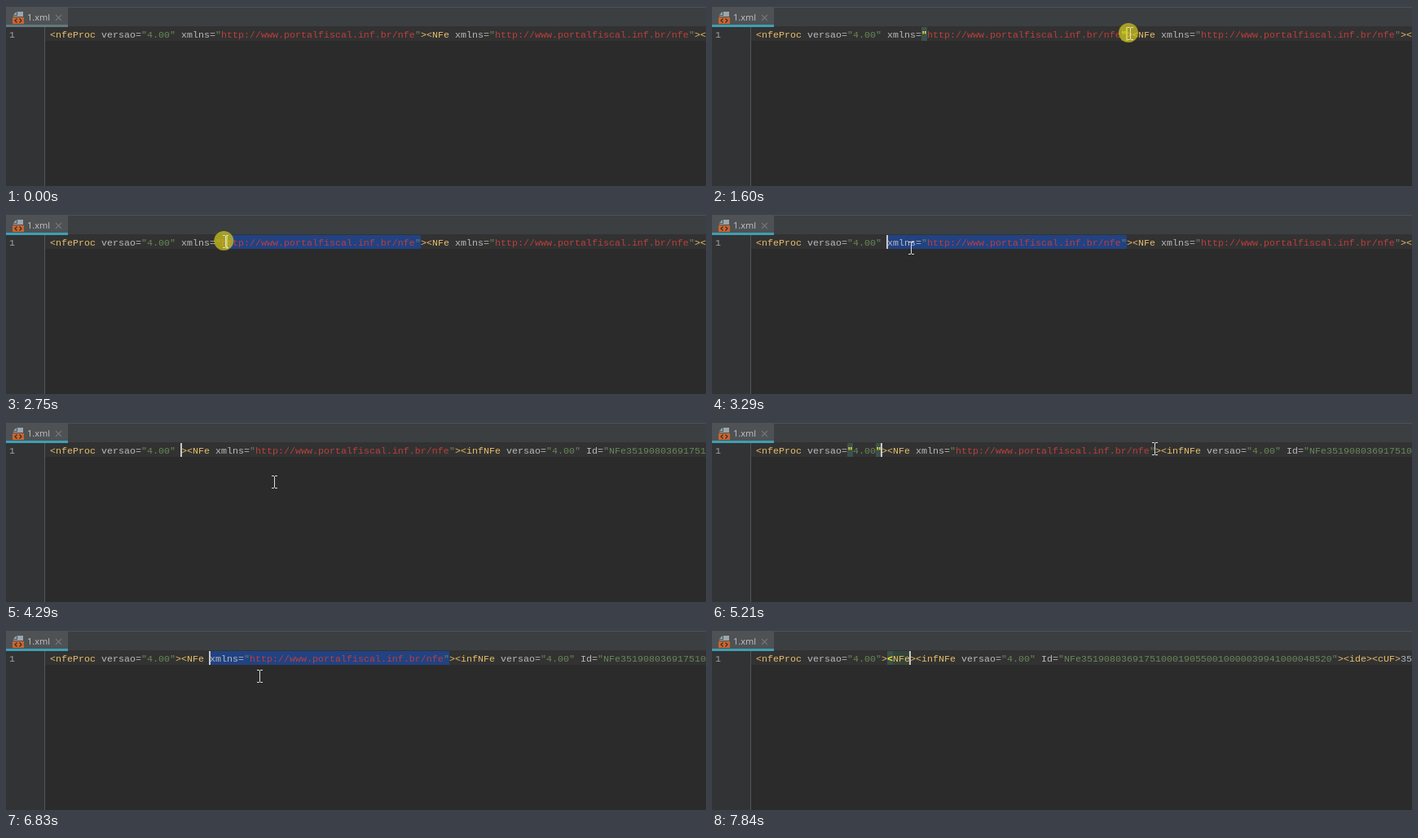
Animation of 859 by 222 pixels, one loop 8 s. Source, as an HTML page with a canvas:

```html
<!DOCTYPE html>
<html lang="en">
<head>
<meta charset="utf-8">
<title>XML editor</title>
<style>
html, body { margin: 0; width: 100%; height: 100%; overflow: hidden; background: #2b2b2b; }
canvas { display: block; }
</style>
</head>
<body>
<canvas id="stage" width="859" height="222"></canvas>
<script>
const ctx = document.getElementById('stage').getContext('2d');
const W = 859, H = 222, LOOP = 8000;
const LEFT = 54, CHAR = 7, ROW = 26, ROW_H = 17, BASE = 39;
const MONO = '11.667px "Courier New", "Liberation Mono", monospace';
const UI = '11px "Segoe UI", "Open Sans", sans-serif';
const COLORS = { tag: '#e8bf6a', attr: '#bababa', text: '#a9b7c6', value: '#6a8759', error: '#bc3f3c' };

const HEAD = '<nfeProc versao="4.00"';
const NS = ' xmlns="http://www.portalfiscal.inf.br/nfe"';
const TAIL = '><infNFe versao="4.00" Id="NFe35190803691751000190550010000039941000048520"><ide><cUF>35';
const SPAN = NS.length - 1;

// Each edit: click, drag left over the namespace, delete it, then delete the space
const EDITS = [
  { press: 1520, start: 1790, end: 3050, cut: 4290, trim: 4700, col: 23, power: 1.2 },
  { press: 5670, start: 5771, end: 6400, cut: 7100, trim: 7450, col: 28, power: 3 }
];
const [FIRST, SECOND] = EDITS;

const between = (t, a, b) => t >= a && t < b;
const colX = col => LEFT + col * CHAR;
const mix = (a, b, k) => a + (b - a) * k;
const smooth = k => k * k * (3 - 2 * k);
const key = (t, x, y) => ({ t, x, y });

function dragPoint(e, t) {
  const k = 1 - Math.pow(1 - (t - e.start) / (e.end - e.start), e.power);
  const lift = 15 * Math.max(0, Math.sin(Math.PI * k / 0.82));
  return key(t, colX(e.col + SPAN * (1 - k)), 33 - lift);
}

const dragEnds = e => [dragPoint(e, e.start), dragPoint(e, e.end)];
const PATH = [
  key(270, 630, 153), key(890, 521, 36), key(1280, 511, 33), key(1600, 511, 33),
  ...dragEnds(FIRST),
  key(3290, 242, 41), key(FIRST.cut - 1, 242, 46), key(FIRST.cut, 327, 73),
  key(5050, 530, 31), key(5210, 541, 32),
  ...dragEnds(SECOND),
  key(6600, 250, 42), key(7200, 430, 83), key(7610, 875, 170)
];

function pointer(t) {
  const drag = EDITS.find(e => between(t, e.start, e.end));
  if (drag) return dragPoint(drag, t);
  const i = PATH.findIndex(p => p.t > t);
  if (i < 1) return null;
  const a = PATH[i - 1], b = PATH[i];
  const k = smooth((t - a.t) / (b.t - a.t));
  return key(t, mix(a.x, b.x, k), mix(a.y, b.y, k));
}

function box(x, y, w, h, color) {
  ctx.fillStyle = color;
  ctx.fillRect(x, y, w, h);
}

function write(str, x, y, color, font) {
  ctx.font = font;
  ctx.fillStyle = color;
  ctx.fillText(str, x, y);
}

function trace(points) {
  ctx.beginPath();
  points.forEach(([x, y]) => ctx.lineTo(x, y));
}

function shape(points, color) {
  trace(points);
  ctx.fillStyle = color;
  ctx.fill();
}

function stroke(points, color) {
  trace(points);
  ctx.strokeStyle = color;
  ctx.lineWidth = 1.1;
  ctx.stroke();
}

function lineAt(t) {
  const gap = e => t < e.cut ? NS : t < e.trim ? ' ' : '';
  return HEAD + gap(FIRST) + '><NFe' + gap(SECOND) + TAIL;
}

function drawCode(line) {
  const tokens = /(<\w*|>)|"(http[^"]*)"|("[^"]*")|(\w+=)|(\w+)/g;
  for (const m of line.matchAll(tokens)) {
    const x = colX(m.index);
    if (m[2]) {
      write('"', x, BASE, COLORS.value, MONO);
      write(m[2], x + CHAR, BASE, COLORS.error, MONO);
      write('"', x + CHAR * (m[2].length + 1), BASE, COLORS.value, MONO);
    } else {
      const kind = m[1] ? 'tag' : m[3] ? 'value' : m[4] ? 'attr' : 'text';
      write(m[0], x, BASE, COLORS[kind], MONO);
    }
  }
}

function markCols(col, count, color) {
  box(colX(col), ROW, count * CHAR, ROW_H, color);
}

function matchedCols(t, line) {
  const clicked = EDITS.find(e => between(t, e.press + 40, e.start));
  if (clicked) return [clicked.col + 6, clicked.col + SPAN - 1];
  if (between(t, FIRST.trim, SECOND.press)) return [HEAD.indexOf('"'), HEAD.length - 1];
  return t >= SECOND.trim ? [line.indexOf('<NFe')] : [];
}

function selectionStart(e, p) {
  if (p.t >= e.end) return e.col;
  return Math.max(e.col, Math.round((p.x + 2 - LEFT) / CHAR));
}

function caretCol(t, edit, p) {
  if (edit) return t < edit.start ? edit.col + SPAN : selectionStart(edit, p);
  const last = EDITS.filter(e => t >= e.cut).pop();
  if (!last) return -1;
  return t < last.trim ? last.col : last.col - 1;
}

function drawTab(focused) {
  box(0, 0, W, 26, '#3c3f41');
  box(0, 1, W, 1, '#4f5355');
  box(0, 2, 76, 21, '#4e5254');
  box(0, 25, W, 1, '#323232');
  box(0, 23, 76, 3, focused ? '#3f9fb3' : '#64787f');
  shape([[14, 7], [21, 7], [21, 13], [9, 13], [9, 12], [14, 12]], '#9aa7b0');
  shape([[13, 7], [13, 11], [9, 11]], '#9aa7b0');
  box(8, 14, 14, 8, '#c9652f');
  stroke([[13.5, 15.5], [11, 18], [13.5, 20.5]], '#3a2a22');
  stroke([[16.5, 15.5], [19, 18], [16.5, 20.5]], '#3a2a22');
  write('1.xml', 26, 18, '#bbbbbb', UI);
  stroke([[61, 11], [68, 18]], '#74787a');
  stroke([[68, 11], [61, 18]], '#74787a');
}

function drawTooltip() {
  shape([[537, 43], [544, 49], [530, 49]], '#4b4d4d');
  box(320, 49, 434, 34, '#636569');
  box(321, 50, 432, 32, '#4b4d4d');
  write('URI is not registered (Settings | Languages & Frameworks | Schemas and DTDs)',
    330, 70, '#bbbbbb', UI);
}

function drawPointer(p, pressed) {
  if (pressed) {
    ctx.beginPath();
    ctx.arc(p.x, p.y, 12, 0, Math.PI * 2);
    ctx.fillStyle = 'rgba(214, 203, 24, 0.7)';
    ctx.fill();
  }
  ctx.save();
  ctx.translate(Math.round(p.x) + 1, Math.round(p.y) + 1);
  if (p.y < ROW) {
    shape([[0, 0], [0, 15], [3.5, 12], [6, 18], [8.5, 17], [6, 11], [11, 11]], '#f4f4f4');
  } else {
    box(1, -7, 1, 14, '#dddddd');
    for (const y of [-8, 7]) {
      box(-2, y, 3, 1, '#dddddd');
      box(2, y, 3, 1, '#dddddd');
    }
  }
  ctx.restore();
}

function draw(t) {
  const p = pointer(t);
  const edit = EDITS.find(e => between(t, e.press, e.cut));
  const line = lineAt(t);

  box(0, 0, W, H, '#2b2b2b');
  drawTab(t >= FIRST.press + 40);
  box(0, ROW, 47, H - ROW, '#313335');
  box(47, ROW, 1, H - ROW, '#555555');
  box(48, ROW, W - 48, ROW_H, '#323232');
  write('1', 4, BASE, '#a4a3a3', MONO);

  const tint = '#35443a';
  if (between(t, 3590, FIRST.cut)) markCols(1, 7, tint);
  if (between(t, 5510, SECOND.start)) markCols(0, 8, tint);
  if (t >= 7840) markCols(line.indexOf('NFe>'), 3, tint);
  if (edit && t >= edit.start) {
    const start = selectionStart(edit, p);
    markCols(start, edit.col + SPAN - start, '#214283');
  }

  drawCode(line);
  for (const col of matchedCols(t, line)) {
    markCols(col, 1, '#3b514d');
    write(line[col], colX(col), BASE, '#ffef28', 'bold ' + MONO);
  }

  const caret = caretCol(t, edit, p);
  const blinkedOff = between(t, 3600, 4050);
  if (caret >= 0 && !blinkedOff) box(colX(caret) - 1, ROW, 2, ROW_H, '#c8c8c8');
  if (between(t, 5360, SECOND.press)) drawTooltip();
  if (p) drawPointer(p, edit && t < edit.end);
}

function tick() {
  draw(performance.now() % LOOP);
  requestAnimationFrame(tick);
}
tick();
</script>
</body>
</html>
```
